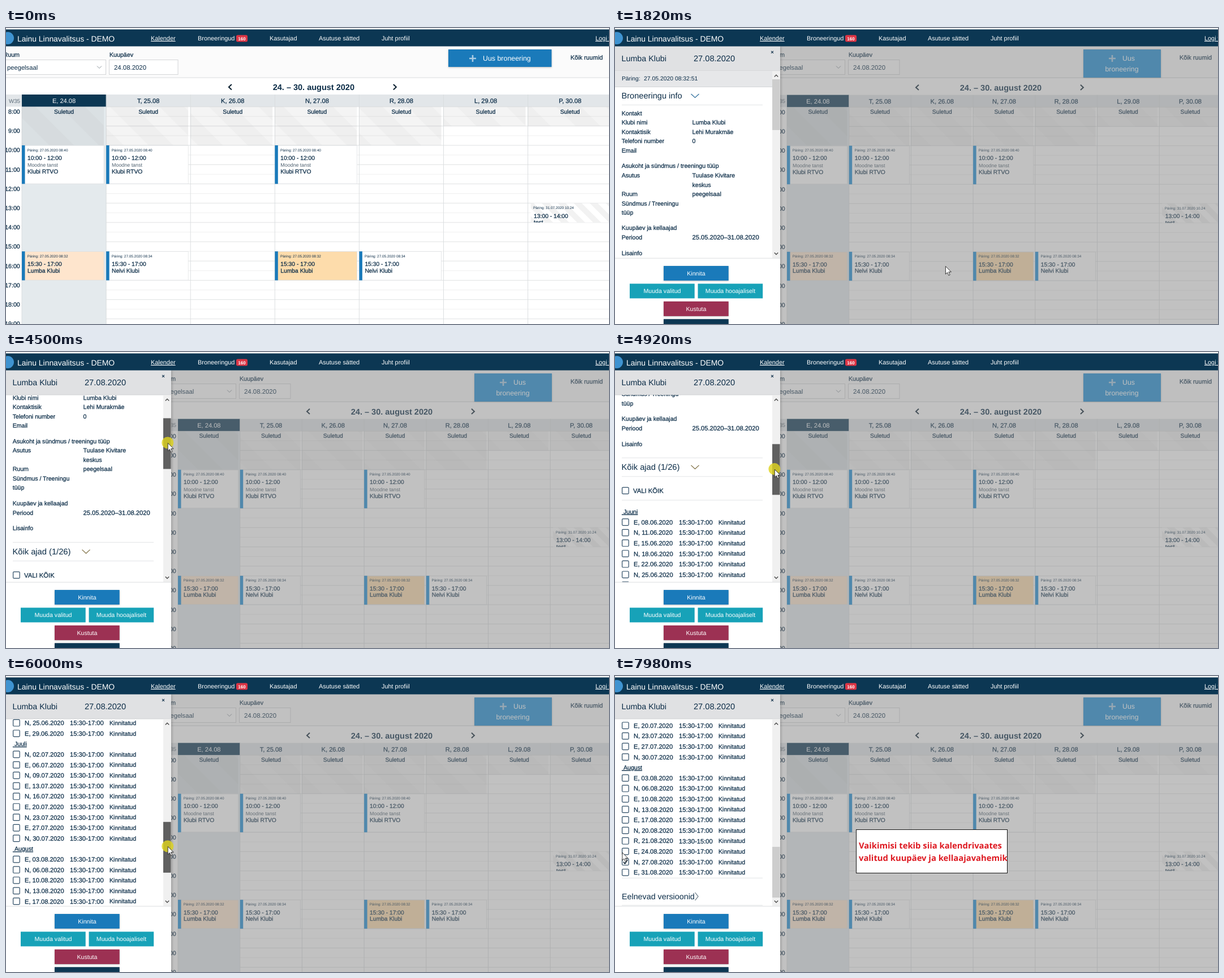
An HTML page that plays this animation: 1066x525 px, repeating every 8000 ms.

```html
<!DOCTYPE html>
<html lang="et">
<head>
<meta charset="utf-8">
<title>Broneeringute kalender</title>
<style>
  html, body { margin: 0; width: 100%; height: 100%; overflow: hidden; background: #fff; }
  svg { display: block; width: 1066px; height: 525px; }
  text {
    font-family: "Liberation Sans", Arial, sans-serif;
    fill: #0b2c47;
    text-rendering: geometricPrecision;
    white-space: pre;
  }
  .mid { stroke: #0b2c47; stroke-width: .25px; }
  .bold { font-weight: 700; }
  .inv { fill: #fff; }
  .u { text-decoration: underline; }
  .c { text-anchor: middle; }
  .r { text-anchor: end; }
  .note { font: 700 14.8px "Open Sans", "Noto Sans", sans-serif; fill: #de1a22; }
  .shadow { filter: drop-shadow(0 1px 1.5px rgba(0, 0, 0, .25)); }
  .blue { fill: #1a7aba; }
  .dim .blue { fill: #1c8ed6; }
</style>
</head>
<body>
<svg id="stage" viewBox="0 0 1066 525">
  <defs>
    <pattern id="wide" width="62" height="62" patternUnits="userSpaceOnUse" patternTransform="rotate(45)">
      <rect width="62" height="62" fill="#000" fill-opacity=".045"/>
      <rect width="62" height="31" fill="#000" fill-opacity=".02"/>
    </pattern>
    <pattern id="fine" width="20" height="20" patternUnits="userSpaceOnUse" patternTransform="rotate(45)">
      <rect width="20" height="20" fill="#fff"/>
      <rect width="20" height="10" fill="#f2f2f2"/>
    </pattern>
    <clipPath id="view"><rect y="76" width="278" height="332"/></clipPath>
    <clipPath id="slot"><rect y="300" width="1066" height="45"/></clipPath>
  </defs>
</svg>
<script>
const LOOP = 8000, NAVY = "#0c3753", TEAL = "#17a2b8", MAX_SCROLL = 692;
const ROW = 34.2, TOP = 139.7;
const stage = document.getElementById("stage");

function add(parent, tag, attrs = {}) {
  const el = document.createElementNS("http://www.w3.org/2000/svg", tag);
  for (const k in attrs) el.setAttribute(k, attrs[k]);
  return parent.appendChild(el);
}
const group = (p, attrs) => add(p, "g", attrs);
const rect = (p, x, y, width, height, fill, more) =>
  add(p, "rect", { x, y, width, height, fill, ...more });
const line = (p, d, stroke, width = 1) =>
  add(p, "path", { d, stroke, "stroke-width": width, fill: "none" });

// y is the vertical middle of the capitals
function text(p, x, y, str, size = 10.6, cls = "") {
  const el = add(p, "text", { x, y: y + size * .36, "font-size": size, class: cls });
  el.textContent = str;
  return el;
}

function topBar(p) {
  rect(p, 0, 0, 1066, 3, "#f4f5f5");
  rect(p, 0, 2.5, 1066, 30, NAVY);
  add(p, "circle", { cx: 3, cy: 18, r: 11, fill: "#3f93d0" });
  text(p, 20, 19, "Lainu Linnavalitsus - DEMO", 13.9, "inv");
  text(p, 256, 18, "Kalender", 10.9, "inv u");
  text(p, 339, 18, "Broneeringud", 10.9, "inv");
  rect(p, 407, 12.5, 20, 12, "#dc3545", { rx: 2.5 });
  text(p, 417, 18.7, "160", 8, "inv bold c");
  text(p, 466, 18, "Kasutajad", 10.9, "inv");
  text(p, 553, 18, "Asutuse sätted", 10.9, "inv");
  text(p, 664, 18, "Juht profiil", 10.9, "inv");
  text(p, 1042, 18, "Logi välja", 10.9, "inv u");
}

function filters(p, left, dateX, dateW, button) {
  rect(p, 0, 32, 1066, 56, "#fbfbfb");
  line(p, "M0 88.2H1066", "#cfd2d4");
  text(p, left - 32.5, 47, "Ruum", 10.7, "mid");
  rect(p, left - 36, 56.5, dateX - left + 30.5, 26, "#fff", { stroke: "#d4d6d8" });
  text(p, left - 26, 69.5, "peegelsaal", 11.2);
  line(p, `M${dateX - 21} 67.5l4 4 4-4`, "#8a949b");
  text(p, dateX + 1, 47, "Kuupäev", 10.65, "mid");
  rect(p, dateX + .5, 56.5, dateW, 26, "#fff", { stroke: "#d4d6d8" });
  text(p, dateX + 9, 69.5, "24.08.2020", 11.4);

  const [x, w, h, plusX] = button;
  rect(p, x, 38, w, h, "", { class: "blue shadow" });
  line(p, `M${plusX - 6} 54h12m-6-6v12`, "#a9cbe3", 2.6);
  if (h > 40) {
    text(p, 908, 54, "Uus", 12.4, "inv c");
    text(p, 896, 72.5, "broneering", 12.4, "inv c");
  } else {
    text(p, 843, 54, "Uus broneering", 12.4, "inv");
  }
  text(p, 998, 52.5, "Kõik ruumid", 10.8, "mid");
}

function card(p, x, w, hour, hours, lines, fill = "#fff") {
  const y = TOP + hour * ROW, h = hours * ROW;
  rect(p, x, y + .3, w, h - .6, fill, { stroke: "#dcdfe1", "stroke-width": .7 });
  rect(p, x, y, 5.5, h, "", { class: "blue" });
  const [asked, span, kind, club] = lines;
  text(p, x + 9.7, y + 8.2, "Päring: 27.05.2020 " + asked, 6.4);
  text(p, x + 10, y + 22, span, 10.3, "mid");
  if (kind) text(p, x + 10, y + 34.7, kind, 8.9).style.fill = "#4c5f6e";
  text(p, x + 10, y + (kind ? 46.2 : 33.7), club, 10.3, "mid");
}

function calendar(p, left, w) {
  const mid = left + w * 3.5 - 6, colX = i => left + w * i, cardW = w * .973;
  rect(p, 0, 88.7, 1066, 436.3, "#fff");
  text(p, mid, 105, "24. – 30. august 2020", 14.5, "bold c");
  line(p, `M${mid - 145} 100l-5 4.7 5 4.7m286-9.4l5 4.7-5 4.7`, "#0b2030", 2);

  rect(p, 0, 118, 1066, 21.5, "#e2e6e9");
  text(p, left - 13, 129, "W35", 9.8, "c").style.fill = "#5b6b78";
  for (let h = 0; h < 12; h++) {
    const y = TOP + h * ROW;
    line(p, `M${left} ${y}H1066`, "#dddfe0", .9);
    line(p, `M${left} ${y + ROW / 2}H1066`, "#efefef", .9);
    text(p, left - 3.3, y + 8.5, h + 8 + ":00", 10.6, "mid r");
  }
  rect(p, left, TOP, w, 390, "#e4eaed");
  rect(p, left, 118, w, 21.5, NAVY);

  [..."ETKNRLP"].forEach((day, i) => {
    const x = colX(i);
    line(p, `M${x} ${i ? 118 : TOP}V525`, "#d9dcde", .9);
    rect(p, x, TOP, cardW, ROW * (i < 5 ? 2 : 1), "url(#wide)");
    text(p, x + w / 2, 129, `${day}, ${24 + i}.08`, 11.1, i ? "c mid" : "c inv");
    text(p, x + w / 2, 148, "Suletud", 10.3, "c mid");
  });

  for (const i of [0, 1, 3])
    card(p, colX(i), cardW, 2, 2, ["08:40", "10:00 - 12:00", "Moodne tanst", "Klubi RTVO"]);
  for (const [i, asked, club, fill] of [
    [0, "08:32", "Lumba Klubi", "#fee5cd"], [1, "08:34", "Nelvi Klubi"],
    [3, "08:32", "Lumba Klubi", "#fddcab"], [4, "08:34", "Nelvi Klubi"]
  ]) card(p, colX(i), cardW, 7.5, 1.5, [asked, "15:30 - 17:00", "", club], fill);

  const x = colX(6);
  rect(p, x + 5, TOP + 5 * ROW, w, ROW, "url(#fine)");
  text(p, x + 9.5, 319, "Päring: 31.07.2020 10.24", 6.4);
  text(p, x + 10.5, 333, "13:00 - 14:00", 10.3, "mid");
  text(group(p, { "clip-path": "url(#slot)" }), x + 10.5, 344.5, "test", 10.3, "mid");
}

function checkbox(p, y, checked) {
  rect(p, 12.6, y - 5.8, 11.6, 11.6, "#fff", { rx: 1.5, stroke: "#2b4a63", "stroke-width": 1.2 });
  if (checked) line(p, `M15 ${y}l2.6 3.2 4.6-7`, "#0b2030", 1.7);
}

function details(p) {
  const rule = y => line(p, `M12 ${y}H261`, "#e2e4e6");
  rect(p, 0, 76, 278, 28.5, "#e6e7e9");
  line(p, "M0 104.5H278", "#d3d5d7");
  text(p, 12, 89.5, "Päring:", 10.3);
  text(p, 51, 89.5, "27.05.2020 08:32:51", 10.4);
  text(p, 11.5, 120, "Broneeringu info", 14.6);
  line(p, "M134.5 117l7 6.5 7-6.5", "#2f6f9c", 1.2);
  rule(136.5);
  for (const [y, label, value = "", size] of [
    [151, "Kontakt"], [167.5, "Klubi nimi", "Lumba Klubi"],
    [184, "Kontaktisik", "Lehi Murakmäe"], [200.5, "Telefoni number", "0"], [217, "Email"],
    [244.3, "Asukoht ja sündmus / treeningu tüüp"], [261, "Asutus", "Tuulase Kivitare"],
    [278, "", "keskus"], [294, "Ruum", "peegelsaal"], [310.7, "Sündmus / Treeningu"],
    [327, "tüüp"], [354.5, "Kuupäev ja kellaajad"],
    [371.2, "Periood", "25.05.2020–31.08.2020", 11.2], [399, "Lisainfo"]
  ]) {
    text(p, 11.7, y, label, 10.6, "mid");
    text(p, 136.5, y, value, size || 10.6, "mid");
  }
  rule(424);
  text(p, 11.5, 440, "Kõik ajad (1/26)", 14.7);
  line(p, "M134.5 437l7 6.5 7-6.5", "#7a6a3c", 1.2);
  rule(457);
  checkbox(p, 482);
  text(p, 32, 482, "VALI KÕIK", 11.3, "mid");
  rule(499);

  let y = 519.3;
  const step = 18.607;
  for (const [name, month, days] of [
    ["Juuni", 6, [8, 11, 15, 18, 22, 25, 29]],
    ["Juuli", 7, [2, 6, 9, 13, 16, 20, 23, 27, 30]],
    ["August", 8, [3, 6, 10, 13, 17, 20, 21, 24, 27, 31]]
  ]) {
    text(p, 12, y, "\u00a0" + name, 10.6, "u mid");
    y += step;
    for (const d of days) {
      const day = "PETKNRL"[new Date(2020, month - 1, d).getDay()];
      checkbox(p, y, month === 8 && d === 27);
      text(p, 33, y, `${day}, ${String(d).padStart(2, 0)}.0${month}.2020`, 11.1, "mid");
      text(p, 113, y, day === "R" ? "13:30-15:00" : "15:30-17:00", 11.2, "mid");
      text(p, 183, y, "Kinnitatud", 10.6, "mid");
      y += step;
    }
  }
  rule(1050.3);
  text(p, 12, 1082.7, "Eelnevad versioonid", 14.3);
  line(p, "M141.5 1076l5.5 7-5.5 7", "#5d6f7c", 1.2);
  rule(1098.7);
}

function sidebar(p) {
  rect(p, 0, 32.5, 292, 500, "#fff", { style: "filter:drop-shadow(1px 0 2px rgba(0,0,0,.25))" });
  rect(p, 0, 32.5, 292, 43.5, "#e0e1e3");
  line(p, "M0 76H292", "#cfd1d3");
  text(p, 11.5, 54, "Lumba Klubi", 14.3);
  text(p, 139, 54, "27.08.2020", 14.6);
  text(p, 278, 42.5, "×", 9.5, "c bold");
  const content = group(group(p, { "clip-path": "url(#view)" }));
  details(content);
  rect(p, 278, 76.5, 14, 331.5, "#f0f0f0");
  line(p, "M281.8 86.5l3.2-3.2 3.2 3.2M281.8 398.5l3.2 3.2 3.2-3.2", "#505050", 1.5);
  const thumb = rect(p, 278, 91, 13.6, 90, "#cdcdcd");

  line(p, "M0 408.3H292", "#dcdee0");
  for (const [x, y, fill, label] of [
    [86, 422, "#1a7aba", "Kinnita"], [26, 453.5, TEAL, "Muuda valitud"],
    [146.5, 453.5, TEAL, "Muuda hooajaliselt"], [86, 485, "#9c3153", "Kustuta"],
    [86, 516.3, NAVY, ""]
  ]) {
    rect(p, x, y, 114.7, 26, fill, { class: fill === TEAL ? "" : "shadow" });
    text(p, x + 57.5, y + 13, label, 10.6, "inv c");
  }
  return { content, thumb };
}

const wide = group(stage);
filters(wide, 28, 182, 121.5, [782, 182.5, 31, 825]);
calendar(wide, 28, 149.1);
const grip = line(wide, "M547.5 441.8h5m-5 2.4h5", "#5b5346", 1);

const narrow = group(stage, { class: "dim" });
filters(narrow, 304, 412, 90.5, [828, 137, 50, 879]);
calendar(group(narrow, { transform: "translate(0 .7)" }), 304, 109.7);
rect(narrow, 0, 32, 1066, 494, "#848484", { "fill-opacity": .5 });
const panel = sidebar(narrow);
for (const el of narrow.querySelectorAll(":scope > text")) el.classList.add("panel");

topBar(stage);

const callout = group(stage);
rect(callout, 426.5, 272.5, 267, 77, "#fff", { stroke: "#151515" });
text(callout, 431, 300.5, "Vaikimisi tekib siia kalendrivaates", 14.8, "note");
text(callout, 431, 322.5, "valitud kuupäev ja kellaajavahemik", 14.8, "note");

const pointer = group(stage);
const halo = add(pointer, "circle", { r: 10.5, fill: "#ded31f", "fill-opacity": .82 });
add(pointer, "path", {
  d: "M.4 .6V14.6L3.6 11.6 5.9 16.8 8.1 15.8 5.9 10.7H10.3Z",
  fill: "#fff", stroke: "#222", "stroke-width": .9
});

// Stepped moves: start, end, steps, x, y, scroll, ease-out power
const moves = [
  [270, 390, 2, 636, 464, 0, 1],
  [610, 1050, 5, 584, 422, 0, 1.5],
  [2470, 2690, 3, 358, 214, 0, 1.5],
  [2910, 3690, 8, 287, 135, 0, 2],
  [3810, 3930, 2, 288, 134, 0, 1],
  [4250, 5020, 8, 280, 230, 308, .7],
  [5140, 5240, 2, 286, 248, 372, 1],
  [5450, 5670, 3, 286, 287.5, 501, 1],
  [5830, 6550, 8, 285, 345, 688, 1],
  [6650, 7100, 5, 285, 346, MAX_SCROLL, 1],
  [7320, 7980, 7, 12.5, 312.5, MAX_SCROLL, 1.5]
];

function pose(t) {
  let now = [656, 466, 0];
  for (const [t0, t1, n, x, y, s, power] of moves) {
    if (t < t0) break;
    const done = Math.min(n, 1 + Math.floor((t - t0 + 15) / ((t1 - t0) / (n - 1))));
    const p = 1 - (1 - done / n) ** power;
    now = [x, y, s].map((v, i) => now[i] + (v - now[i]) * p);
  }
  return now;
}

const show = (el, on) => { el.style.display = on ? "" : "none"; };
const within = (t, a, b) => t >= a && t < b;

function draw() {
  const t = performance.now() % LOOP;
  const [x, y, scroll] = pose(t);
  const dragging = within(t, 4250, 7100);
  const open = t >= 1820;
  show(wide, !open);
  show(narrow, open);
  show(grip, within(t, 830, 1820));
  show(callout, t >= 7980);
  show(pointer, t >= 270);
  show(halo, dragging || within(t, 1270, 1390));
  pointer.setAttribute("transform", `translate(${x} ${y})`);
  panel.content.setAttribute("transform", `translate(0 ${-scroll})`);
  panel.thumb.setAttribute("y", 91 + scroll / MAX_SCROLL * 212);
  panel.thumb.setAttribute("fill", dragging ? "#606060" : within(x, 278, 292) ? "#a6a6a6" : "#cdcdcd");
  requestAnimationFrame(draw);
}
draw();
</script>
</body>
</html>
```
